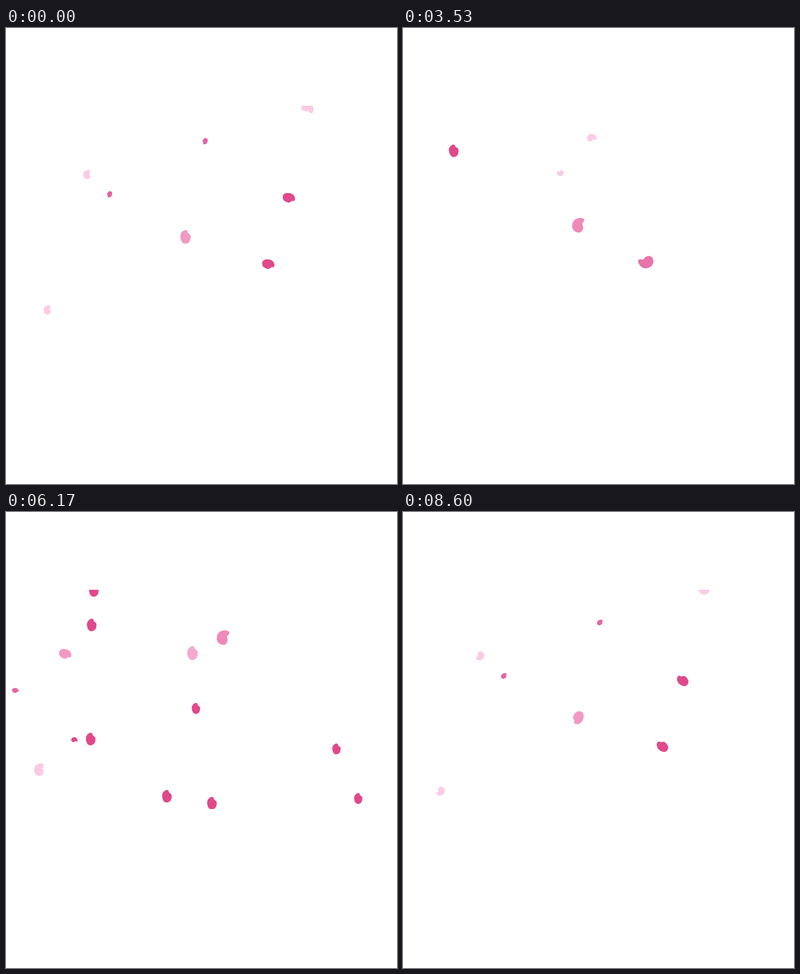
An HTML page with a canvas that plays this animation: 692 by 809 pixels, repeating every 8630 ms.

```html
<!DOCTYPE html>
<html lang="en">
<head>
<meta charset="utf-8">
<title>Falling petals</title>
<style>
html, body { margin: 0; width: 100%; height: 100%; overflow: hidden; background: #fff; }
canvas { display: block; }
</style>
</head>
<body>
<canvas id="stage" width="692" height="809"></canvas>
<script>
const ctx = document.getElementById('stage').getContext('2d');
const LOOP = 8630, STEPS = 216, SPIN = 11; // ms, steps per loop, degrees per step
const LEFT = -20, TOP = 120; // petals blow in across these two edges
const rad = Math.PI / 180;

// bean: notch faces right; drop: tip faces right
const bean = new Path2D('M7-13C1-15-11-11-11 0C-11 9-5 13 1 13C7 13 10 8 9 3C9 0 6-2 6-4C8-7 10-11 7-13Z');
const drop = new Path2D('M11 0C11 4 10 5 8 4.5C6 4 4 7 1 8.5C-4 8-11 6-11-1C-11-8-4-9 1-8.5C7-8 10-4 11 0Z');

const dark = '#e0498b', rose = '#e5659f', soft = '#f099c3', pale = '#fccae4';
const petals = [];

// A kind shares its shape, size, speed and pose; each petal adds when it enters,
// where (along the top, or down the left edge if negative) and its heading.
function kind(shape, color, size, speed, phase, ...flights) {
  for (const [birth, entry, heading] of flights) {
    petals.push({
      shape, color, size, phase, birth,
      x: entry < 0 ? LEFT : entry,
      y: entry < 0 ? TOP - entry : TOP,
      vx: speed * Math.cos(heading * rad),
      vy: speed * Math.sin(heading * rad)
    });
  }
}

kind(drop, dark, 1, 6.15, 5,
  [146.7, 115, 25.2], [131.2, 37, 35], [119.6, -157, 36.5], [86.1, -99, 43.1], [66.4, 0, 47.4]);
kind(drop, dark, .87, 9, 5, [93.2, 238, 45.2], [108, 300, 46.5], [114.5, 64, 40]);
kind(drop, rose, .52, 6.15, 105, [174.8, 0, 43.7], [199.6, 292, 53.3], [143.3, -142, 56.3]);
kind(bean, dark, .42, 6.15, 190, [112.6, -72, 56.4]);
kind(bean, '#ee8ab8', 1, 6.15, 122, [33.2, 64, 43], [118, 188, 27.6]);
kind(bean, '#e874a9', 1, 5.32, 3, [18.5, 208, 53]);
kind(drop, '#f4a9cf', 1.1, 9.75, 5, [123.5, 63, 26]);
kind(drop, soft, 1.08, 9.75, -100, [173.7, -14, 35]);
kind(drop, soft, 1, 9.75, 115, [138.9, -54, 32]);
kind(bean, pale, .85, 5.6, 110, [212, 527, 72.5], [134.9, -265, 42.5]);
kind(bean, pale, .62, 8.05, 0, [191.1, -24, 35.4], [201.5, -310, 37]);
kind(bean, pale, .62, 7, 185, [68.2, 217, 32.7]);
kind(bean, pale, .46, 7.88, 10, [20, 148, 62], [50.5, 17, 27.7]);

function draw(step) {
  ctx.clearRect(0, 0, 692, 809);
  ctx.save();
  ctx.beginPath();
  ctx.rect(0, 138, 692, 389);
  ctx.clip();
  for (const p of petals) {
    const age = (step - p.birth + STEPS) % STEPS;
    ctx.save();
    ctx.translate(p.x + p.vx * age, p.y + p.vy * age);
    ctx.rotate((SPIN * step + p.phase) * rad);
    ctx.scale(p.size, p.size);
    ctx.fillStyle = p.color;
    ctx.fill(p.shape);
    ctx.restore();
  }
  ctx.restore();
}

// 25 steps a second shown on a 30 Hz clock: every fifth step is held twice as long
function frame() {
  const t = performance.now() % LOOP;
  const tick = Math.floor((t + 4) * 30 / 1000);
  draw(Math.min(Math.floor(tick * 5 / 6), STEPS - 1));
  requestAnimationFrame(frame);
}
frame();
</script>
</body>
</html>
```
